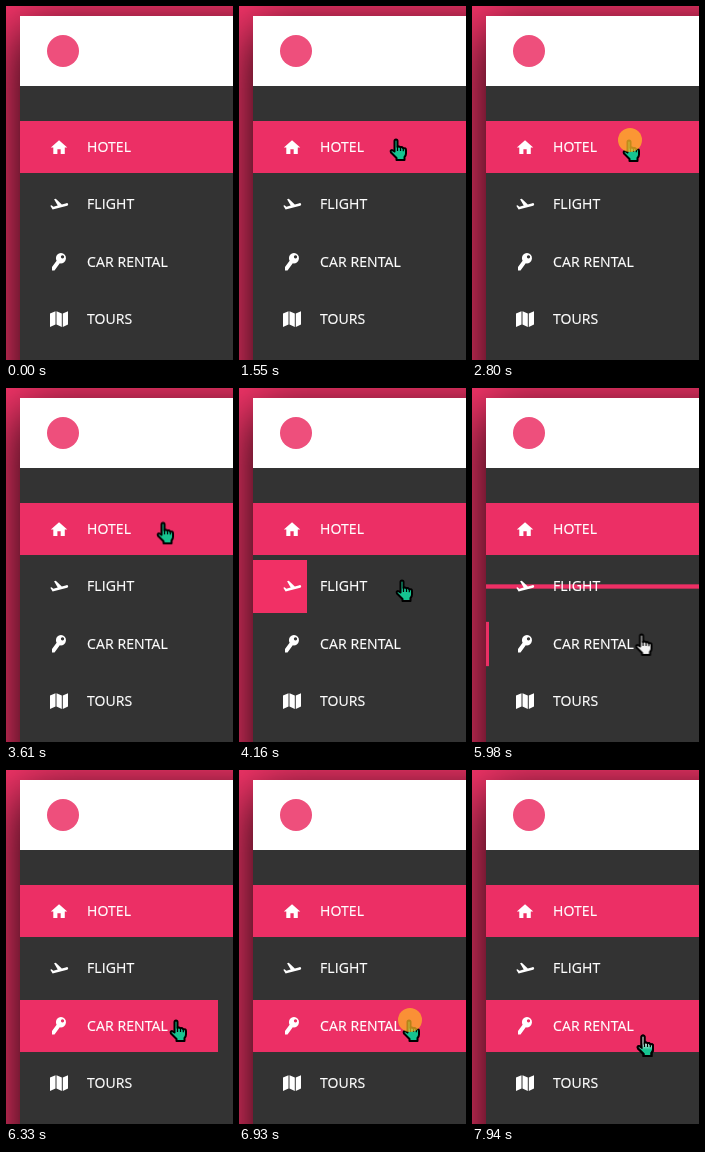
An HTML page that plays this animation: 227 by 354 pixels, repeating every 8000 ms.

```html
<!DOCTYPE html>
<html lang="en">
<head>
<meta charset="utf-8">
<title>Travel menu</title>
<style>
  :root { --pink: #ec2f65; --hot: #ff3366; --teal: #16c490; }
  html, body { margin: 0; width: 100%; height: 100%; overflow: hidden; }
  body { position: relative; background: #f23468; }

  .panel {
    position: absolute; left: 14px; top: 10px; width: 320px; height: 480px;
    background: #333; box-shadow: 0 15px 50px #000;
  }
  .head { height: 70px; background: #fff; }
  .logo { position: absolute; left: 41px; top: 29px; width: 32px; height: 32px; border-radius: 50%; background: #ee4f7c; }

  .bar { position: absolute; left: 14px; width: 213px; height: 52px; background: var(--pink); }
  .hotel { top: 115px; }
  .flight { top: 172px; height: 53px; animation: flight 8s infinite; }
  .car { top: 230px; animation: car 8s infinite; }

  svg { position: absolute; left: 0; top: 0; }
  .menu { fill: #fff; font: 14px "Open Sans", sans-serif; letter-spacing: .1px; }
  .menu text { stroke: #fff; stroke-width: .2; }

  .cursor { animation: move 8s infinite; }
  .hand { fill: var(--teal); stroke: #000; stroke-width: 2; stroke-linejoin: round; animation: tint 8s infinite; }
  .creases { fill: none; stroke: #000; stroke-width: 1.2; }
  .shine { opacity: 0; animation: shine 8s infinite step-end; }
  .click { fill: #ffb924; opacity: 0; animation: click 8s infinite linear; }

  /* Rows grow in height first, then in width; they leave by collapsing in height. */
  @keyframes flight {
    0%, 47.125% { width: 3px; transform: scaleY(0); background: var(--pink); animation-timing-function: ease; }
    49.625% { width: 3px; transform: none; background: var(--pink); animation-timing-function: cubic-bezier(1, 0, 0, 1); }
    54.625% { width: 213px; background: var(--hot); }
    73.125% { width: 213px; transform: none; background: var(--hot); animation-timing-function: ease; }
    75.625%, 100% { width: 213px; transform: scaleY(0); background: var(--pink); }
  }
  @keyframes car {
    0%, 73.375% { width: 3px; transform: scaleY(0); animation-timing-function: ease; }
    75.875% { width: 3px; transform: none; animation-timing-function: cubic-bezier(1, 0, 0, 1); }
    80.875%, 100% { width: 213px; transform: none; }
  }
  @keyframes move {
    0%, 12.2% { transform: translate(228px, 107px); animation-timing-function: cubic-bezier(.3, .5, .6, 1); }
    19.375% { transform: translate(150px, 132px); }
    25.125% { transform: translate(150px, 132px); animation-timing-function: step-end; }
    26% { transform: translate(150px, 133px); }
    45.125% { transform: translate(150px, 133px); animation-timing-function: cubic-bezier(.33, 1, .68, 1); }
    51.5% { transform: translate(156px, 191px); }
    72.125% { transform: translate(156px, 191px); animation-timing-function: cubic-bezier(.25, 1, .5, 1); }
    77.5% { transform: translate(163px, 249px); }
    99.24% { transform: translate(163px, 249px); }
    99.25%, 100% { transform: translate(164px, 264px); }
  }
  @keyframes tint {
    0%, 72.24% { fill: var(--teal); }
    72.25%, 77.4% { fill: #f2f2f2; }
    77.5%, 100% { fill: var(--teal); }
  }
  @keyframes shine {
    0% { opacity: 0; }
    99.25%, 100% { opacity: 1; }
  }
  @keyframes click {
    0%, 25.125% { opacity: 0; }
    26%, 35% { opacity: .76; }
    36.5%, 59.6% { opacity: 0; }
    60.4%, 67.25% { opacity: .76; }
    68.1%, 85.75% { opacity: 0; }
    86.7%, 92.6% { opacity: .76; }
    93.5%, 100% { opacity: 0; }
  }
</style>
</head>
<body>
  <div class="panel"><div class="head"></div></div>
  <div class="logo"></div>
  <div class="bar hotel"></div>
  <div class="bar flight"></div>
  <div class="bar car"></div>

  <svg class="menu" width="227" height="354">
    <path transform="translate(43.2 131.7) scale(.82)" d="M10 20v-6h4v6h5v-8h3L12 3 2 12h3v8z"/>
    <path transform="translate(42.7 189.600) scale(.88)" d="M22.070 9.640c-.21-.8-1.040-1.280-1.840-1.060L14.920 10l-6.900-6.430-1.930.51 4.140 7.170-4.970 1.330-1.970-1.540-1.450.39 2.590 4.490L21 11.490c.81-.23 1.280-1.050 1.070-1.850z"/>
    <path fill-rule="evenodd" d="M55 247a5.200 5.200 0 1 1-1.200 10.300L48.500 264.500H46v-3.600l4.600-6.200A5.200 5.200 0 0 1 55 247zM56.500 249.300a1.600 1.600 0 1 0 .01 0z"/>
    <path d="M44 307.500l5.500-2.200v13.200l-5.500 2.500zM50.500 305.300l5.300 2.200v13.500l-5.300-2.500zM56.800 307.500l5.200-2.200v13.200l-5.200 2.500z"/>
    <text x="81" y="146">HOTEL</text>
    <text x="81" y="203">FLIGHT</text>
    <text x="81" y="261">CAR RENTAL</text>
    <text x="81" y="318">TOURS</text>
  </svg>

  <svg width="227" height="354">
    <defs>
      <linearGradient id="glow" x2="0" y2="1">
        <stop offset=".35" stop-color="#fff"/>
        <stop offset=".7" stop-color="#fff" stop-opacity="0"/>
      </linearGradient>
      <path id="shape" d="M5.500 3Q5.500 1.500 7 1.500T8.500 3V9Q10 8 11.500 9.200 13 8.800 14.300 10.200 17 9.800 17 12V15.500Q17 17.500 15.500 19V22H7.500V20L2 14.500Q1 12.200 3 12L5.500 13.500Z"/>
    </defs>
    <g class="cursor">
      <use href="#shape" class="hand"/>
      <use href="#shape" class="shine" fill="url(#glow)" stroke="#000" stroke-width="2"/>
      <path class="creases" d="M8.500 8v5M11.500 9.200v3.800M14.300 10.200v3"/>
      <circle class="click" cx="8" cy="1" r="12"/>
    </g>
  </svg>
</body>
</html>
```
